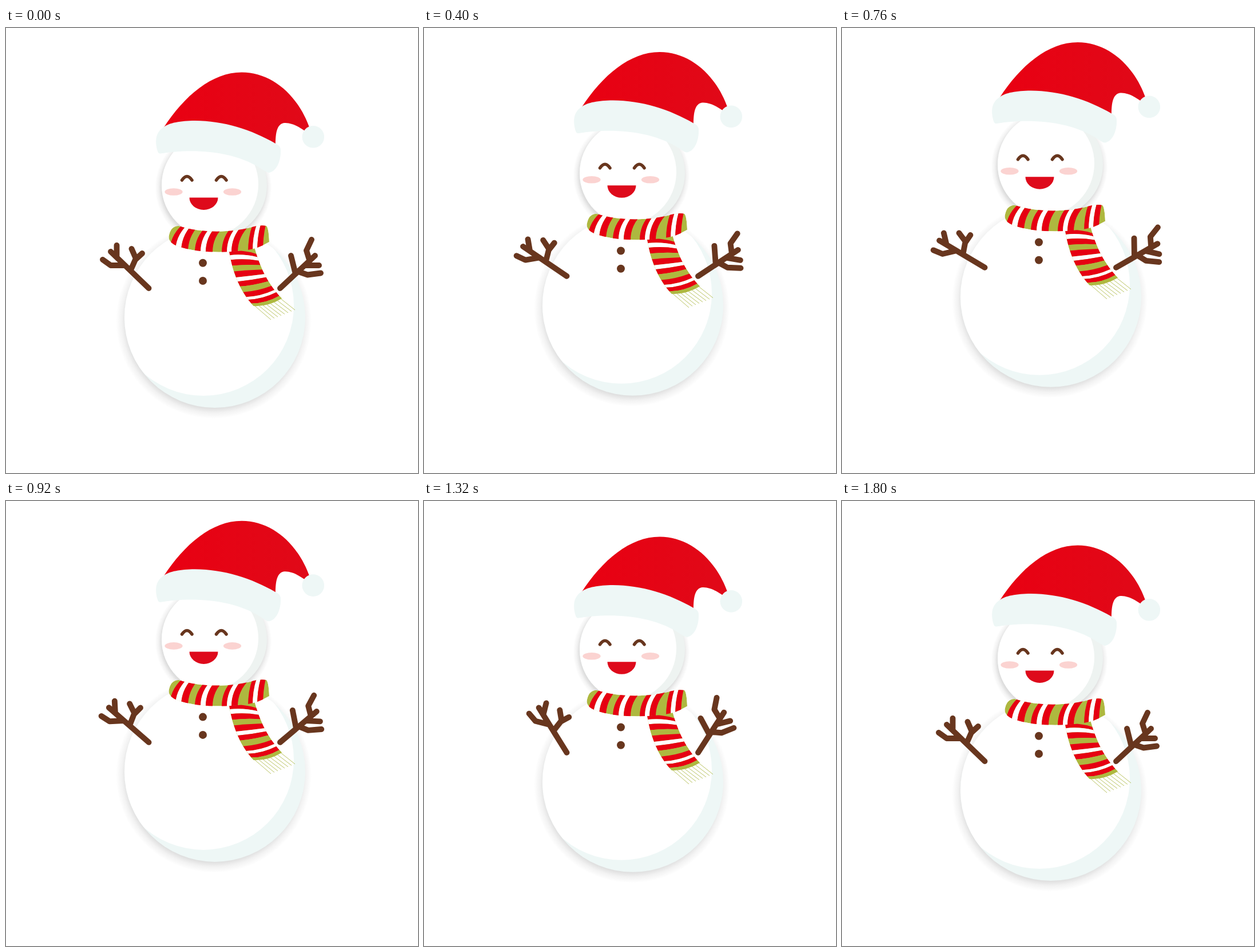
An HTML page that plays this animation: 720x778 px, repeating every 2.44 s.

```html
<!DOCTYPE html>
<html lang="en">
<head>
<meta charset="utf-8">
<title>Snowman</title>
<style>
  html, body { margin: 0; width: 100%; height: 100%; overflow: hidden; background: #fff; }
  svg { display: block; width: 720px; height: 778px; }
  .twig { fill: none; stroke: #68361e; stroke-width: 9.9; stroke-linecap: round; stroke-linejoin: round; }
  .eye { fill: none; stroke: #68361e; stroke-width: 5.5; stroke-linecap: round; }
</style>
</head>
<body>
<svg viewBox="0 0 720 778">
  <defs>
    <radialGradient id="shade">
      <stop offset=".82" stop-color="#000" stop-opacity=".18"/>
      <stop offset=".89" stop-color="#000" stop-opacity=".125"/>
      <stop offset=".94" stop-color="#000" stop-opacity=".05"/>
      <stop offset="1" stop-color="#000" stop-opacity="0"/>
    </radialGradient>
    <linearGradient id="felt">
      <stop offset="0" stop-color="#e90012"/>
      <stop offset="1" stop-color="#e00918"/>
    </linearGradient>
    <clipPath id="bodyClip"><circle cx="365" cy="506" r="158"/></clipPath>
    <clipPath id="headClip"><circle cx="364" cy="275" r="92"/></clipPath>
    <clipPath id="bandClip"><path id="bandShape" d="M302 346C340 359 395 358 430 348Q445 344 455 346Q459 349 460 374Q450 380 437 385C400 394 340 394 308 384Q284 378 284.5 365Q287 346 302 346Z"/></clipPath>
  </defs>

  <g id="body">
    <circle cx="363" cy="512" r="171" fill="url(#shade)"/>
    <circle cx="365" cy="506" r="158" fill="#eef7f6"/>
    <circle cx="345" cy="485" r="158" fill="#fff" clip-path="url(#bodyClip)"/>

    <circle cx="362.5" cy="279" r="102" fill="url(#shade)"/>
    <circle cx="364" cy="275" r="92" fill="#eef3f1"/>
    <circle cx="349" cy="273" r="92" fill="#fff" clip-path="url(#headClip)"/>
    <path class="eye" d="M307.5 266Q316.3 253 325 266M367.5 266Q376.3 253 385 266"/>
    <g fill="#fbd3d1">
      <ellipse cx="293" cy="286.5" rx="15.6" ry="6.3"/>
      <ellipse cx="395.5" cy="286.5" rx="15.6" ry="6.3"/>
    </g>
    <path d="M320.5 296.5H370.5A25 21.5 0 0 1 320.5 296.5Z" fill="#de0a1b"/>

    <g fill="#68361e">
      <circle cx="344" cy="410.7" r="7"/>
      <circle cx="344" cy="442" r="7"/>
    </g>
    <g id="tail">
      <path d="M390 390C396 430 412 465 433 486L482 473C458 448 444 420 434 383Z" fill="#aeb83f"/>
    </g>
    <g clip-path="url(#bandClip)">
      <use href="#bandShape" fill="#aeb83f"/>
      <g id="band"></g>
    </g>
    <path id="armL" class="twig" d="M249.5 455L183 391M169 405L183 415H208M193.5 380V400M219.5 386L226.5 402M238 394L226 405L218 423"/>
    <path id="armR" class="twig" d="M479 455L540 398M534 370L525 389L530 405M498 398L505.5 428M547 415H522M550 428.5L527 431.5L508 425"/>
  </g>

  <g id="hat">
    <path fill="url(#felt)" d="M275 175C312 118 360 77.5 412 77.5C465 77.5 511 118 531 176L525 182C506 168 496 166 486 166C474 168 471 182 471 204L400 200L300 190Z"/>
    <path fill="#eef7f6" d="M276 173C285 166 305 162 330 162C380 162 430 178 471 202C475 204 479 206 480 212C481 230 474 250 460 253Q456 253 452 250C400 212 320 211 270 219.5Q267 220 265.5 217C260 200 260 183 276 173Z"/>
    <circle cx="536.8" cy="190.3" r="19.3" fill="#eef7f6"/>
  </g>
</svg>
<script>
const $ = id => document.getElementById(id);
const RED = '#e60012', WHITE = '#fff', GREEN = '#aeb83f';

function draw(parent, d, attrs) {
  const p = document.createElementNS('http://www.w3.org/2000/svg', 'path');
  p.setAttribute('d', d);
  for (const k in attrs) p.setAttribute(k, attrs[k]);
  parent.append(p);
}

// Scarf band: curved red, white, red groups given by their top and bottom edges.
const groups = [
  [[308, 317, 325, 338], [286, 296, 306, 318]],
  [[353, 362, 370, 384], [330, 340, 349, 361]],
  [[398, 406, 414, 427], [377, 386, 394, 405]],
  [[431, 438, 445, 454], [423, 431, 439, 449]]
];
for (const [top, low] of groups) {
  const bend = i => low[i] - (top[i] - low[i]) * .05;
  [RED, WHITE, RED].forEach((fill, i) => {
    const j = i + 1;
    draw($('band'), `M${top[i]} 344Q${bend(i)} 365 ${low[i]} 395H${low[j]}Q${bend(j)} 365 ${top[j]} 344Z`, { fill });
  });
}

// Scarf tail: arched cross bars between two curved sides.
const sideL = [[390, 390], [396, 430], [412, 465], [433, 486]];
const sideR = [[434, 383], [444, 420], [458, 448], [482, 473]];
const at = (pts, u) => [0, 1].map(k => {
  const v = 1 - u;
  return v * v * v * pts[0][k] + 3 * v * v * u * pts[1][k] + 3 * v * u * u * pts[2][k] + u * u * u * pts[3][k];
});
const bars = [0, .06, .13, .22, .31, .41, .48, .57, .68, .78, .84, .93, 1];
const hues = [RED, WHITE, RED, GREEN];
const left = u => at(sideL, u);
const right = u => at(sideR, u + .11 * (1 - u));
const mid = u => {
  const a = left(u), b = right(u);
  return [(a[0] + b[0]) / 2, (a[1] + b[1]) / 2 - 5 + 13 * u];
};
for (let i = 0; i < bars.length - 1; i++) {
  const u = bars[i], w = bars[i + 1];
  draw($('tail'), `M${left(u)}Q${mid(u)} ${right(u)}L${right(w)}Q${mid(w)} ${left(w)}Z`, { fill: hues[i % 4] });
}
for (let i = 0; i < 8; i++) {
  const k = i / 7;
  const x = 435 + 46 * k, y = 486 - 12 * k + 8 * k * (1 - k);
  draw($('tail'), `M${x} ${y}L${463 + 42 * k} ${510 - 17 * k}`, { stroke: '#b9c362', 'stroke-width': 1 });
}

// Cubic ease with handles (a, 0) and (b, 1).
function ease(x, a, b) {
  let lo = 0, hi = 1, s = .5;
  for (let i = 0; i < 24; i++) {
    s = (lo + hi) / 2;
    const v = 1 - s;
    if (3 * s * v * v * a + 3 * s * s * v * b + s * s * s < x) lo = s; else hi = s;
  }
  return s * s * (3 - 2 * s);
}

// Keys: [time, value, handle a, handle b]; the handles shape the way to that key.
function track(keys, t) {
  for (let i = 1; i < keys.length; i++) {
    const [t0, v0] = keys[i - 1], [t1, v1, a = 1 / 3, b = 2 / 3] = keys[i];
    if (t < t1) return v0 + (v1 - v0) * ease((t - t0) / (t1 - t0), a, b);
  }
  return keys[keys.length - 1][1];
}

const LOOP = 2440, STEP = 40;
const bodyY = [[0, 0], [720, -36.4], [1800, 0]];
const hatY = [[0, 0], [640, -55.6, .35, .73], [1800, 0, .22, .56]];
const swing = [[0, 0], [670, -15.2], [1240, 15], [1800, 0]];

function pose(now) {
  const t = Math.floor(Math.max(0, now - start) % LOOP / STEP) * STEP;
  const turn = track(swing, t);
  $('body').setAttribute('transform', `translate(0 ${track(bodyY, t)})`);
  $('hat').setAttribute('transform', `translate(0 ${track(hatY, t)})`);
  $('armL').setAttribute('transform', `rotate(${turn} 249.5 455)`);
  $('armR').setAttribute('transform', `rotate(${-turn} 479 455)`);
}

const start = performance.now();
function tick() {
  pose(performance.now());
  requestAnimationFrame(tick);
}
tick();
</script>
</body>
</html>
```
